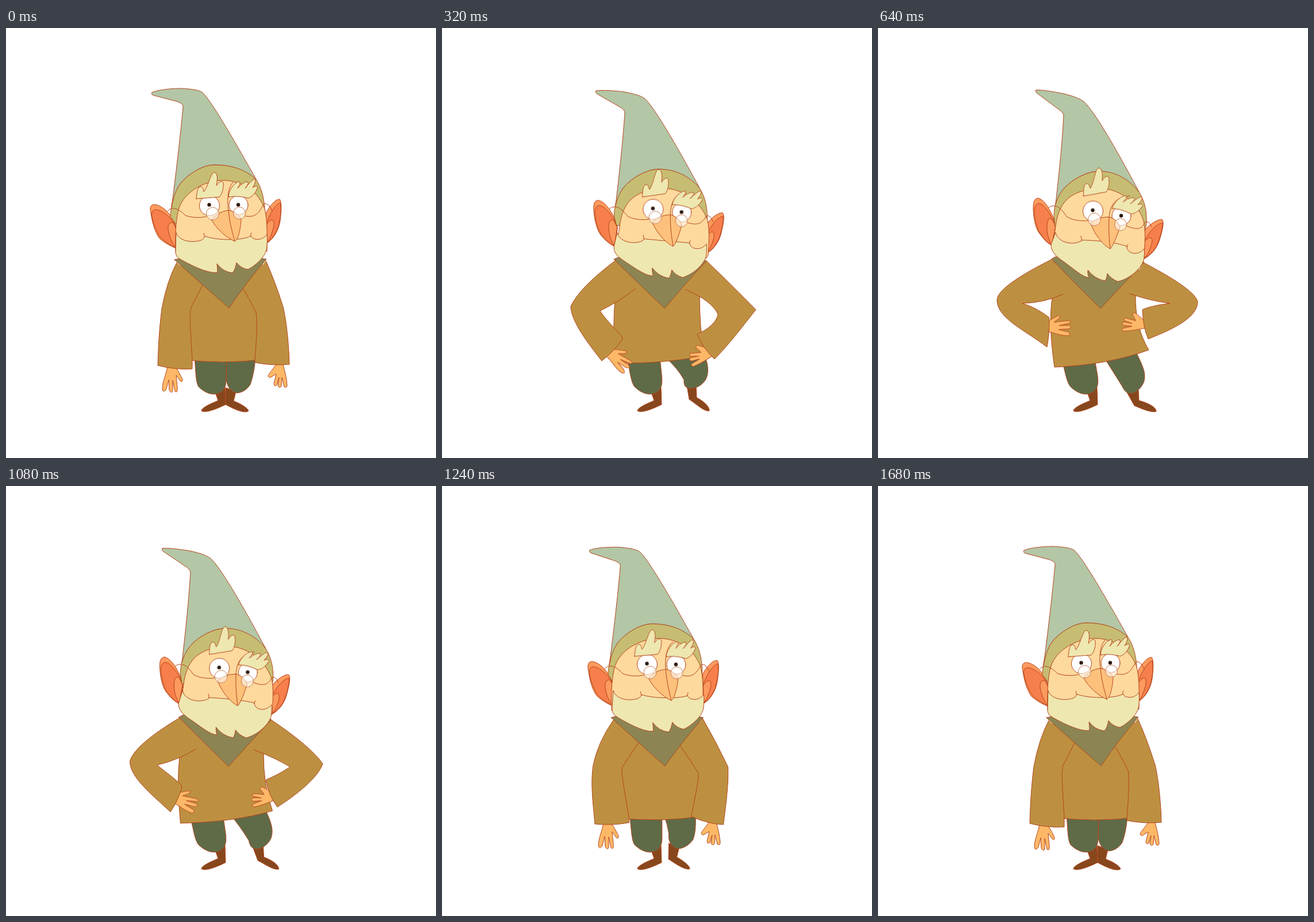
An HTML page without scripts that plays this animation: 748 by 748 pixels, repeating every 1.72 s.

```html
<!DOCTYPE html>
<html lang="en">
<head>
<meta charset="utf-8">
<title>Gnome</title>
<style>
html, body { margin: 0; width: 100%; height: 100%; overflow: hidden; background: #fff }
svg { display: block; width: 100%; height: 100%; stroke: #b4441c; stroke-width: 1; stroke-linejoin: round; stroke-linecap: round }

/* limbs: four poses, four ticks between each */
.move { animation: 1720ms steps(4) -2ms infinite }
/* head: two poses, twelve ticks */
.two {
  animation-timing-function: linear(0 0% 8.33%, .07 8.33% 16.67%, .14 16.67% 25%, .215 25% 33.33%,
    .29 33.33% 41.67%, .39 41.67% 50%, .5 50% 58.33%, .58 58.33% 66.67%, .667 66.67% 75%,
    .76 75% 83.33%, .85 83.33% 91.67%, .93 91.67% 100%, 1 100%);
}

#shoeL, #shoeR { fill: #87471d }
#legL, #legR { fill: #5f6b47 }
#torso, #armL, #armR { fill: #bd9041 }
#handL, #handR { fill: #fdb867 }
#scarf { fill: #8c8553 }
#earL, #earR, #conchL, #conchR { fill: #fd9a5d }
#innerL, #innerR { fill: #f77f4b }
#hat { fill: #b3c6a5 }
#band { fill: #c6bd72 }
#face { fill: #fed99d }
#nose { fill: #fdc17b }
#beard, .brow { fill: #eee7b0 }
#lines { fill: none }
.eye { fill: #fff }
.pupil { fill: #2e1a12; stroke: none }
.lens { fill: #fff; fill-opacity: .55; stroke: #c47a52 }

.shift { animation-name: shift; transform-box: fill-box; transform-origin: center }
@keyframes shift {
  0%, 74.42%, to { transform: translate(0px, 0px) rotate(0deg) }
  27.91%, 60.47% { transform: translate(var(--x), var(--y)) rotate(var(--r, 0deg)) }
}

#handL { animation-name: handL; transform-origin: 288px 592px }
@keyframes handL {
  0%, 74.42%, to { transform: translate(0px, 0px) rotate(0deg) }
  9.3%, 69.77% { transform: translate(0px, -5px) rotate(0deg) }
  13.95%, 67.44% { transform: translate(5px, -17px) rotate(-4deg) }
  18.6%, 65.12% { transform: translate(4px, -26px) rotate(-55deg) }
  27.91%, 60.47% { transform: translate(6px, -72px) rotate(-91deg) }
}
#handR { animation-name: handR; transform-origin: 476px 589px }
@keyframes handR {
  0%, 74.42%, to { transform: translate(0px, 0px) rotate(0deg) }
  9.3%, 69.77% { transform: translate(-10px, -2px) rotate(0deg) }
  13.95%, 67.44% { transform: translate(-17px, -13px) rotate(8deg) }
  18.6%, 65.12% { transform: translate(-11px, -23px) rotate(72deg) }
  27.91%, 60.47% { transform: translate(-15px, -73px) rotate(93deg) }
}

#legL { animation-name: legL }
@keyframes legL {
  0%, 74.42%, to { d: path("M328,570C330,598 330,616 335,624C346,635 360,640 371,635C382,630 383,622 383,605L384,570Z") }
  27.91%, 60.47% { d: path("M317,565C326,600 328,616 335,624C346,635 360,640 371,635C382,630 384,620 382,605L376,570Z") }
}
#legR { animation-name: legR }
@keyframes legR {
  0%, 74.42%, to { d: path("M384,570Q384,590 383,610C384,622 390,633 402,635C412,634 420,628 425,620C430,605 433,590 434,570Z") }
  9.3%, 69.77% { d: path("M386,570Q401,586 406,600C402,615 410,626 418,627C430,628 444,617 449,609C453,598 450,585 448,566Z") }
  18.6%, 65.12% { d: path("M387,571Q410,592 421,612C420,622 424,627 433,627C443,627 455,620 460,609C464,598 464,585 455,566Z") }
  27.91%, 60.47% { d: path("M390,568Q407,595 424,622C428,630 432,636 440,636C450,635 460,624 463,614C466,600 462,590 447,560Z") }
}
#shoeR { animation-name: shoeR }
@keyframes shoeR {
  0%, 74.42%, to { d: path("M382,626L382,655C395,662 415,672 422,666C420,660 405,652 396,649L400,632Z") }
  9.3%, 69.77% { d: path("M407,618L406,643C415,651 432,666 440,666C443,660 428,648 421,642L426,622Z") }
  18.6%, 65.12% { d: path("M426,622L430,646C440,652 456,668 465,666C466,658 452,647 443,643L442,622Z") }
  27.91%, 60.47% { d: path("M432,632L446,657C458,662 476,670 484,667C484,658 465,651 454,648L453,630Z") }
}
#torso { animation-name: torso }
@keyframes torso {
  0%, 74.42%, to { d: path("M305,405L301,490Q298,540 301,576Q380,586 450,576Q450,540 447,490L445,405Z") }
  9.3%, 69.77% { d: path("M305,405L301,490Q298,540 301,579Q390,584 446,574Q453,540 449,490L450,405Z") }
  18.6%, 65.12% { d: path("M305,405L301,470Q297,520 300,583Q390,584 456,570Q448,520 448,465L455,405Z") }
  27.91%, 60.47% { d: path("M305,405L303,470Q296,515 307,590Q400,586 471,560Q447,520 448,465L455,405Z") }
}
#armL { animation-name: armL }
@keyframes armL {
  0%, 74.42%, to { d: path("M342,447Q326,478 322,486C319,500 320,510 324,577L324,593Q295,595 264,587C265,550 267,520 271,488Q280,440 297,408") }
  9.3%, 69.77% { d: path("M342,446Q320,470 304,495C306,505 312,535 326,573L327,578Q300,587 268,589C260,550 250,520 254,488Q260,455 300,405") }
  18.6%, 65.12% { d: path("M337,453Q310,475 275,492C283,505 300,522 313,537L314,541Q300,562 278,579C255,550 224,510 224,484Q240,450 305,402") }
  27.91%, 60.47% { d: path("M322,463Q290,478 251,479C262,482 280,490 297,503L298,507Q298,535 294,555C255,525 207,505 207,473Q207,450 303,402") }
}
#armR { animation-name: armR }
@keyframes armR {
  0%, 74.42%, to { d: path("M413,454Q428,480 435,495C438,510 435,550 433,578L433,582Q465,588 493,585C492,550 488,510 482,485Q468,440 452,405") }
  9.3%, 69.77% { d: path("M417,452Q438,475 457,505C455,520 442,545 436,565L435,568Q460,588 486,593C495,565 510,525 513,492Q486,450 455,404") }
  18.6%, 65.12% { d: path("M424,455Q470,475 480,498C478,510 465,523 447,531L444,533Q452,555 474,576C500,550 530,510 546,490Q506,449 459,404") }
  27.91%, 60.47% { d: path("M437,462Q475,475 508,479C490,481 475,484 462,489L460,490Q461,520 470,541C510,525 556,505 556,476Q552,455 460,407") }
}

#scarf { animation-name: scarf }
@keyframes scarf {
  0%, 74.42%, to { d: path("M293,403L306,400L440,400L453,402Q420,440 388,487Q345,450 293,403Z") }
  27.91%, 60.47% { d: path("M302,402L308,398L455,404L463,407Q425,447 387,488Q345,447 302,402Z") }
}
#earL { animation-name: earL }
@keyframes earL {
  0%, 74.42%, to { d: path("M296,346C290,326 273,308 258,307C250,307 250,315 252,322C255,345 263,362 268,367C278,375 288,380 295,383Z") }
  27.91%, 60.47% { d: path("M310,348C307,328 292,299 279,296C271,296 270,305 270,315C271,340 277,354 283,360C290,370 296,375 302,378Z") }
}
#innerL { animation-name: innerL }
@keyframes innerL {
  0%, 74.42%, to { d: path("M295,346C292,333 272,316 260,316C253,317 253,323 254,328C257,345 266,362 270,366C280,374 286,378 295,382Z") }
  27.91%, 60.47% { d: path("M309,345C305,330 290,306 280,305C273,306 272,313 272,320C273,340 280,357 285,361C292,371 297,375 302,377Z") }
}
#conchL { animation-name: conchL }
@keyframes conchL {
  0%, 74.42%, to { d: path("M296,350Q292,338 288,338Q281,340 282,350Q284,367 295,382Z") }
  27.91%, 60.47% { d: path("M309,345Q303,331 299,331Q294,334 294,345Q293,362 302,377Z") }
}
#earR { animation-name: earR }
@keyframes earR {
  0%, 74.42%, to { d: path("M452,322C460,307 470,297 476,298C480,302 479,320 477,335C474,355 462,370 454,374Z") }
  27.91%, 60.47% { d: path("M464,352C472,341 488,332 494,333C499,337 494,355 490,368C485,385 474,396 462,402Z") }
}
#innerR { animation-name: innerR }
@keyframes innerR {
  0%, 74.42%, to { d: path("M453,340C461,318 470,306 477,304C479,315 478,325 476,335C473,355 462,369 454,373Z") }
  27.91%, 60.47% { d: path("M464,370C474,350 487,340 495,339C495,348 492,358 489,368C484,385 474,395 463,400Z") }
}
#conchR { animation-name: conchR }
@keyframes conchR {
  0%, 74.42%, to { d: path("M453,342Q461,331 465,335Q468,340 464,352Q460,366 454,373Z") }
  27.91%, 60.47% { d: path("M464,371Q473,362 476,366Q478,372 474,382Q470,394 463,400Z") }
}
#hat { animation-name: hat }
@keyframes hat {
  0%, 74.42%, to { d: path("M254,112C262,108 285,105 305,105C320,106 333,107 340,111C350,117 380,165 435,263C415,245 390,238 362,238C340,238 310,258 299,277C294,286 290,300 288,312C298,235 304,180 308,137C308,132 303,130 298,128L256,117Q252,115 254,112Z") }
  27.91%, 60.47% { d: path("M275,108C285,107 305,111 322,114C338,118 350,122 358,128C370,138 400,183 454,285C437,264 415,250 386,249C362,249 335,265 322,281C314,291 311,300 309,306C317,235 321,190 323,152C322,148 319,145 315,142L276,113Q273,110 275,108Z") }
}
#band { animation-name: band }
@keyframes band {
  0%, 74.42%, to { d: path("M286,328C287,306 292,288 299,277C310,258 340,238 362,238C392,238 418,246 435,263C444,277 449,295 450,315L450,340L295,340Z") }
  27.91%, 60.47% { d: path("M306,325C307,304 313,291 322,281C335,265 362,249 386,249C418,249 440,266 454,285C463,300 468,315 467,340L464,355L308,345Z") }
}
#face { animation-name: face }
@keyframes face {
  0%, 74.42%, to { d: path("M295,390C294,352 296,322 304,306C314,286 342,266 377,265C410,265 440,285 450,315C455,335 454,360 454,378L454,388Z") }
  27.91%, 60.47% { d: path("M302,380C304,370 308,355 309,345C311,327 317,310 328,299C340,287 362,279 388,279C417,280 450,300 462,335C466,352 464,380 463,395L460,400Z") }
}
#beard { animation-name: beard }
@keyframes beard {
  0%, 74.42%, to { d: path("M296,356C300,370 322,375 340,369Q345,366 346,362C362,369 408,371 426,362C429,369 446,371 454,359C455,370 454,380 453,386C450,398 436,412 421,420Q408,418 401,408Q399,420 394,426Q377,424 367,410Q368,420 368,425C352,428 320,412 303,402Q295,398 295,390Z") }
  27.91%, 60.47% { d: path("M309,356C312,372 335,378 350,372Q354,371 355,369C372,369 412,372 433,380C432,392 452,398 463,384C464,392 463,400 462,405C456,420 437,437 417,441Q405,436 399,427Q398,436 395,440Q376,436 365,421Q364,428 367,434C356,434 340,418 318,403Q300,390 301,377Z") }
}
#nose { animation-name: nose }
@keyframes nose {
  0%, 74.42%, to { d: path("M358,334C362,326 375,318 388,317C400,320 407,328 409,333C408,350 404,368 398,371C385,366 364,348 358,334Z") }
  27.91%, 60.47% { d: path("M370,340C376,333 390,328 403,329C413,332 419,340 421,346C416,362 408,380 404,384C392,379 376,358 370,340Z") }
}
/* brow ridge, glasses arms, mouth corners */
#lines { animation-name: lines }
@keyframes lines {
  0%, 74.42%, to { d: path("M395,268C384,280 385,305 387,318C389,340 395,360 398,371M281,319C288,309 300,314 312,326C325,331 340,330 349,328M416,327C440,332 443,312 449,306Q456,303 463,318M344,357Q344,361 346,363M427,356Q425,358 426,362") }
  27.91%, 60.47% { d: path("M438,292C412,295 404,308 402,329C401,350 402,370 404,384M297,312C308,305 318,312 328,328C340,336 358,336 366,335M432,344C450,352 459,350 463,340Q469,331 476,346M353,362Q355,366 354,370M435,376Q433,377 433,381") }
}
</style>
</head>
<body>
<svg viewBox="0 0 748 748">
  <path id="shoeL" d="M364,634L369,648C360,652 340,660 340,666C348,671 372,660 382,655L381,626Z"/>
  <path id="shoeR" class="move"/>
  <path id="legL" class="move two"/>
  <path id="legR" class="move"/>
  <path id="torso" class="move"/>
  <path id="handL" class="move" d="M281,588C279,602 272,615 272,628Q274,636 279,628L283,612L284,630Q288,637 290,631L290,613L294,632Q299,636 298,625L296,604L303,614Q308,617 307,611Q302,600 294,588Z"/>
  <path id="handR" class="move" d="M470,585C463,596 456,602 456,606Q459,610 463,606L470,602L466,619Q467,625 471,621L475,608L473,622Q475,628 479,623L480,608L484,624Q489,627 489,621C488,608 485,598 482,585Z"/>
  <path id="armL" class="move"/>
  <path id="armR" class="move"/>
  <path id="scarf" class="move two"/>

  <path id="earL" class="move two"/>
  <path id="innerL" class="move two"/>
  <path id="conchL" class="move two"/>
  <path id="earR" class="move two"/>
  <path id="innerR" class="move two"/>
  <path id="conchR" class="move two"/>
  <path id="band" class="move two"/>
  <path id="hat" class="move two"/>
  <path id="face" class="move two"/>
  <path id="beard" class="move two"/>
  <g class="move two shift" style="--x:20px;--y:9.5px">
    <circle class="eye" cx="354" cy="309" r="17.5"/>
    <circle class="pupil" cx="353.5" cy="307.5" r="3.2"/>
  </g>
  <g class="move two shift" style="--x:19px;--y:19px">
    <circle class="eye" cx="404.5" cy="308" r="16.5"/>
    <circle class="pupil" cx="404" cy="307.5" r="3.2"/>
  </g>
  <path id="nose" class="move two"/>
  <path id="lines" class="move two"/>
  <circle class="lens move two shift" style="--x:17px;--y:10px" cx="359.5" cy="323" r="11"/>
  <circle class="lens move two shift" style="--x:16px;--y:20px" cx="406" cy="322" r="10.5"/>
  <path class="brow move two shift" style="--x:24px;--y:-7px;--r:-6deg" d="M331,297C332,287 333,277 338,276C343,276 343,281 344,285C352,276 355,254 362,251C369,252 368,264 366,274C370,268 377,264 378,270C379,280 375,290 371,294C358,295 345,296 331,297Z"/>
  <path class="brow move two shift" style="--x:23px;--y:26px;--r:13deg" d="M387,294C387,283 396,270 405,267C409,267 406,274 403,279C409,271 418,266 421,268C422,271 419,275 416,279C423,270 430,262 433,263C435,267 432,273 429,278C435,273 439,275 437,279C434,287 428,294 421,296C410,293 400,292 387,294Z"/>
</svg>
</body>
</html>
```
